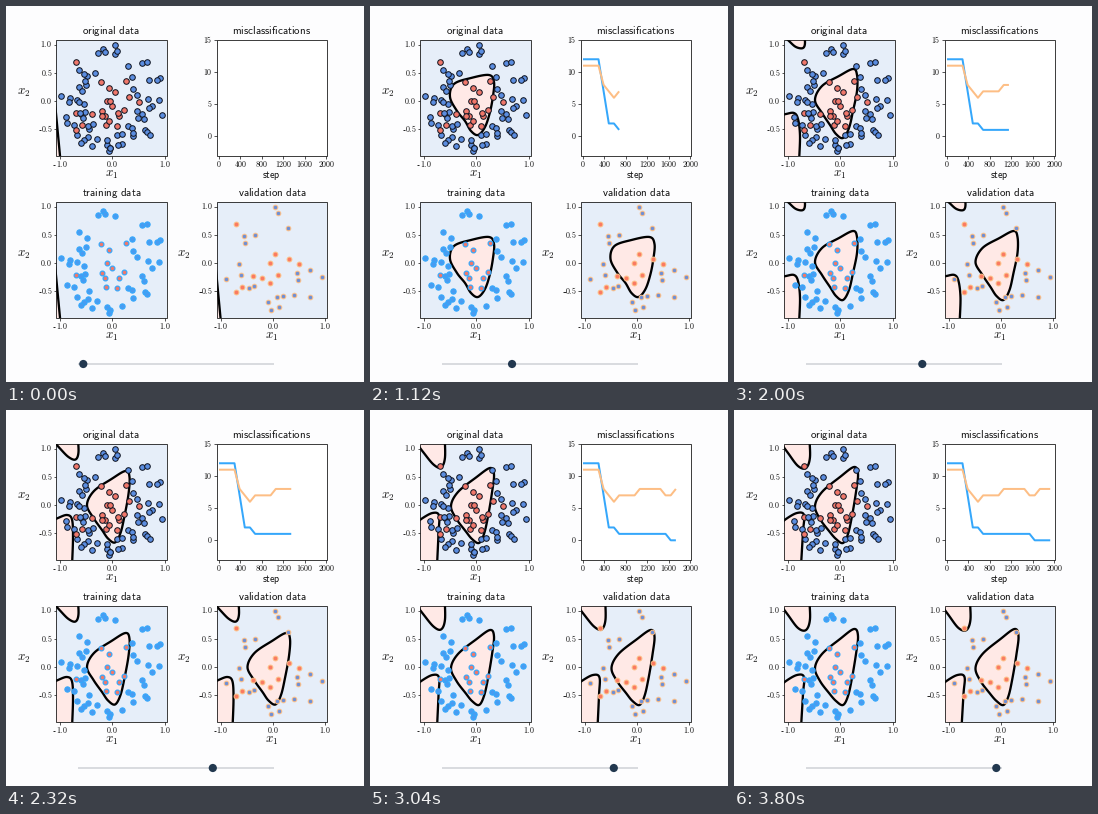
These frames come from a looping animation (358x376 px, 3.84 s). A matplotlib script:

```python
import numpy as np
import matplotlib.pyplot as plt
from matplotlib.animation import FuncAnimation
from matplotlib.patches import Circle, Polygon, Rectangle

W, H = 358, 376
FRAMES, INTERVAL = 96, 40
PX = 0.72  # points per pixel at 100 dpi
INK = "#111111"
BLUE, RED = "#5b8de0", "#f0776a"
TRAIN, VALID = "#35a7fb", "#fdbe85"
PALE_BLUE, PALE_RED = "#e6eef9", "#ffe9e6"

plt.rcParams["mathtext.fontset"] = "cm"
fig = plt.figure(figsize=(W / 100, H / 100), dpi=100, facecolor="#fdfdfe")
ax = fig.add_axes([0, 0, 1, 1])
ax.set(xlim=(0, W), ylim=(H, 0))
ax.axis("off")

# Samples, in pixels of the top left panel
train_blue = np.array([
    (97, 43), (92, 47), (99, 46), (109, 48), (136, 57), (141, 56), (73, 64),
    (81, 70), (73, 81), (80, 79), (76, 85), (55, 90), (64, 92), (71, 94),
    (63, 96), (78, 98), (143, 74), (126, 71), (154, 72), (151, 74), (127, 83),
    (131, 89), (142, 93), (153, 94), (146, 100), (136, 108), (138, 113),
    (75, 108), (79, 106), (77, 112), (61, 117), (68, 119), (83, 123),
    (82, 131), (71, 129), (78, 134), (75, 137), (91, 133), (86, 140),
    (101, 139), (104, 142), (103, 145), (116, 138), (122, 120), (126, 122),
    (127, 130), (139, 124), (141, 126)])
train_red = np.array([
    (95, 76), (120, 75), (103, 82), (101, 95), (106, 100), (96, 105),
    (99, 110), (118, 104), (113, 110), (111, 120), (100, 119), (70, 107)])
valid_blue = np.array([
    (108.5, 39), (111, 45), (121.5, 60), (77.5, 68), (88.5, 67), (78.5, 75),
    (72.5, 96), (74, 107), (59.5, 111), (155.5, 109), (130.5, 105),
    (131.5, 112), (143, 102), (82, 120), (87, 118), (110.5, 129), (116, 128),
    (127, 127), (143.5, 129), (101, 134), (104, 142), (112, 139)])
valid_red = np.array([
    (69.5, 56), (108.5, 86), (122.5, 91), (132.5, 96), (103.5, 95), (86, 108),
    (111.5, 107), (95.5, 110), (103, 115), (75.5, 119), (69.5, 124)])

# Decision boundary at chosen training steps
CORE = {
    4: [(119, 72), (123, 78), (121, 88), (117, 97), (112, 106), (104, 111),
        (97, 108), (92, 102), (90, 95), (93, 87), (100, 79), (109, 74)],
    7: [(119, 69), (124, 76), (123, 90), (120, 106), (115, 121), (108, 129),
        (101, 125), (95, 115), (87, 105), (80, 91), (84, 78), (101, 72)],
    12: [(119, 63), (123, 69), (123, 85), (119, 105), (115, 122), (109, 132),
         (102, 128), (96, 119), (88, 107), (81, 94), (88, 80), (105, 70)],
    16: [(120, 59), (124, 65), (122, 83), (118, 107), (114, 124), (109, 133),
         (102, 129), (96, 121), (87, 109), (81, 96), (88, 82), (106, 68)],
    20: [(120, 57), (124, 64), (122, 82), (118, 106), (114, 124), (109, 133),
         (102, 129), (95, 121), (86, 109), (81, 96), (88, 82), (106, 67)],
}
TOP = {
    12: [(46, 26), (55, 35), (62, 41), (69, 42), (71, 36), (69, 24)],
    16: [(46, 33), (53, 42), (63, 53), (70, 57), (74, 48), (74, 24)],
    20: [(46, 32), (54, 43), (64, 56), (72, 58), (76, 47), (75, 24)],
}
BOTTOM = {
    12: [(44, 110), (52, 108), (60, 107), (64, 113), (66, 130), (65, 156)],
    16: [(44, 114), (52, 108), (62, 103), (68, 106), (68, 125), (67, 156)],
    20: [(44, 116), (52, 109), (63, 103), (70, 105), (69, 122), (67, 156)],
}
# The corner regions slide in from outside the panel
TOP[7] = np.add(TOP[12], (-22, -18))
BOTTOM[7] = np.add(BOTTOM[12], (-24, 0))
WEDGE = np.array([(49, 97), (54.6, 156), (40, 156), (40, 97)])
HIDDEN = np.array([(-9, -9), (-8, -9), (-8, -8)])

train_errors = [12] * 4 + [7, 2, 2] + [1] * 10 + [0] * 4
valid_errors = [11] * 4 + [8, 7, 6] + [7] * 4 + [8] * 5 + [7] * 2 + [8] * 3


def blend(keys, step):
    steps = sorted(keys)
    hi = next(s for s in steps if s >= step)
    lo = max(s for s in steps if s <= step)
    t = (step - lo) / (hi - lo) if hi > lo else 0
    return (1 - t) * np.array(keys[lo], float) + t * np.array(keys[hi], float)


def smooth(pts, closed):
    """Catmull-Rom curve through the points."""
    if closed:
        p = np.vstack([pts[-1:], pts, pts[:2]])
    else:
        p = np.vstack([pts[:1], pts, pts[-1:]])
    t = np.linspace(0, 1, 10, endpoint=False)[:, None]
    parts = [0.5 * (2 * b + (c - a) * t + (2 * a - 5 * b + 4 * c - d) * t**2
                    + (3 * b - a - 3 * c + d) * t**3)
             for a, b, c, d in zip(p, p[1:], p[2:], p[3:])]
    return np.vstack(parts + ([] if closed else [pts[-1:]]))


def corner(keys, step, outer):
    return np.vstack([smooth(blend(keys, step), False), outer])


def boundary(step):
    """Outlines of the centre, top left and bottom left regions."""
    if step == 0:
        return HIDDEN, HIDDEN, WEDGE
    core = smooth(blend(CORE, step), True) if step >= 4 else HIDDEN
    if step <= 7:
        return core, HIDDEN, HIDDEN
    return (core, corner(TOP, step, [(30, 10), (20, 26)]),
            corner(BOTTOM, step, [(20, 170), (20, 110)]))


def sans(x, y, s, size, ha="center"):
    s = s.replace(" ", r"\ ")
    ax.text(x, y, rf"$\mathsf{{{s}}}$", fontsize=size * PX, ha=ha,
            va="baseline", color=INK)


def segment(xs, ys, width=0.7):
    ax.plot(xs, ys, color=INK, lw=width * PX, solid_capstyle="butt", zorder=6)


def x_tick(x, bottom, label):
    segment([x, x], [bottom, bottom + 2.5])
    if label[0] == "-":
        segment([x - 7, x - 4.6], [bottom + 8.7] * 2, 0.9)
        sans(x + 1.5, bottom + 11.3, label[1:], 8)
    else:
        sans(x, bottom + 11.3, label, 8)


def y_tick(y, left, label):
    segment([left - 2.5, left], [y, y])
    if label[0] == "-":
        segment([left - 17.6, left - 15.2], [y + 0.4] * 2, 0.9)
    sans(left - 4, y + 2.8, label.lstrip("-"), 8, "right")


def frame_box(x, y, title, fill):
    box = Rectangle((x, y), 110.5, 116, fc=fill, ec="none", zorder=0)
    ax.add_patch(box)
    ax.add_patch(Rectangle((x, y), 110.5, 116, fc="none", ec=INK,
                           lw=0.8 * PX, zorder=6))
    sans(x + 55.2, y - 5.5, title, 11)
    return box


def scatter(pts, face, edge, radius, width):
    ax.plot(pts[:, 0], pts[:, 1], "o", ms=2 * radius * PX, mfc=face, mec=edge,
            mew=width * PX, zorder=4)


def data_panel(dx, dy, title):
    box = frame_box(50.3 + dx, 34 + dy, title, PALE_BLUE)
    for v in (-1, 0, 1):
        x_tick(106.3 + 52.2 * v + dx, 150 + dy, f"{v:.1f}")
    for v in (1, 0.5, 0, -0.5):
        y_tick(95 - 56.4 * v + dy, 50.3 + dx, f"{v:.1f}")
    for x, y, s in ((105.3, 170.5, "$x_1$"), (17.5, 88.5, "$x_2$")):
        ax.text(x + dx, y + dy, s, fontsize=13 * PX, ha="center",
                va="baseline", color=INK)
    regions = []
    for _ in range(3):
        patch = Polygon(HIDDEN, fc=PALE_RED, ec="black", lw=2.3 * PX,
                        joinstyle="round", zorder=2)
        ax.add_patch(patch)
        patch.set_clip_path(box)
        regions.append(patch)
    return regions, (dx, dy)


panels = [data_panel(0, 0, "original data"),
          data_panel(0, 162, "training data"),
          data_panel(160.5, 162, "validation data")]

for blue, red in ((train_blue, train_red), (valid_blue, valid_red)):
    scatter(blue, BLUE, "#101522", 2.8, 1)
    scatter(red, RED, "#101522", 2.8, 1)
scatter(train_blue + (0, 162), "#4a9bf0", TRAIN, 2.6, 1.2)
scatter(train_red + (0, 162), RED, TRAIN, 2.4, 1.2)
scatter(valid_blue + (160.5, 162), "#6f8fd4", VALID, 2.3, 1)
scatter(valid_red + (160.5, 162), "#fa7a62", VALID, 2.4, 1)

frame_box(210.8, 34, "misclassifications", "white")
for v in range(0, 2001, 400):
    x_tick(213 + 0.0537 * v, 150, str(v))
for v in (0, 5, 10, 15):
    y_tick(130.3 - 6.42 * v, 210.8, str(v))
sans(265.5, 171.5, "step", 10)
curves = [(ax.plot([], [], color=c, lw=2 * PX, zorder=3,
                   solid_capstyle="butt")[0], errors)
          for c, errors in ((TRAIN, train_errors), (VALID, valid_errors))]

ax.plot([72.5, 267], [358, 358], color="#d9dbdf", lw=2 * PX, zorder=1)
knob = Circle((77, 358), 4.1, fc="#22384f", ec="none", zorder=5)
ax.add_patch(knob)


def draw(frame):
    step = int(np.interp(frame, [0, 12, 64.4, 73.2, 86], [0, 4, 16, 18, 20]))
    shapes = boundary(step)
    for regions, offset in panels:
        for patch, shape in zip(regions, shapes):
            patch.set_xy(shape + np.array(offset))
    n = np.arange(step + 1)
    for curve, errors in curves:
        curve.set_data(213 + 5.16 * n, 130.3 - 6.42 * np.array(errors)[n])
    knob.center = (77.3 + 9.25 * step, 358)
    return []


anim = FuncAnimation(fig, draw, frames=FRAMES, interval=INTERVAL, repeat=True)
plt.show()
```
